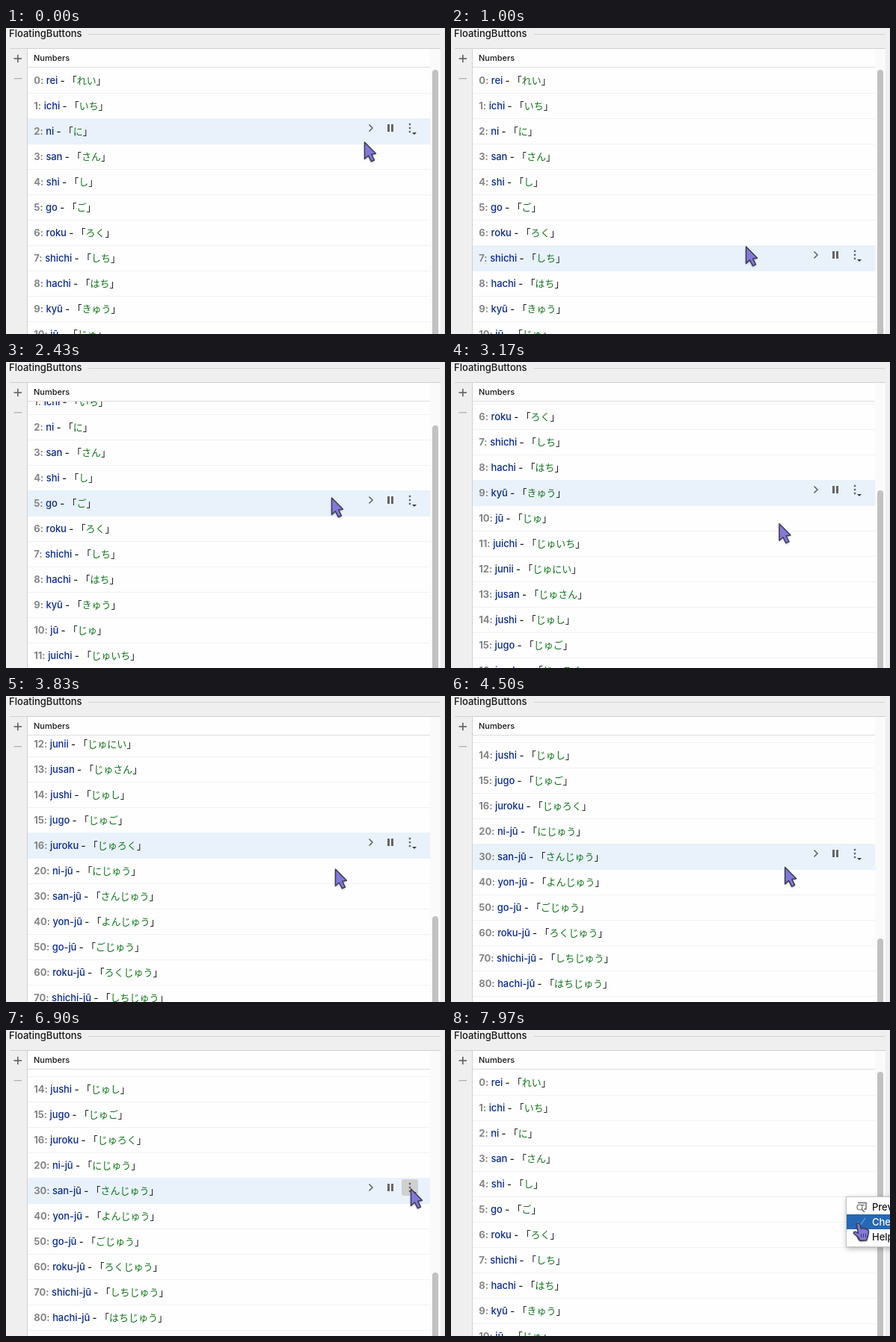
An HTML page with a canvas for the animation above (8000 ms loop, 587x410 px).

```html
<!DOCTYPE html>
<html lang="en">
<head>
<meta charset="utf-8">
<title>Hover list</title>
<style>
html, body { margin: 0; width: 100%; height: 100%; overflow: hidden; background: #efefef; }
canvas { display: block; }
</style>
</head>
<body>
<canvas id="stage" width="587" height="410"></canvas>
<script>
const ctx = document.getElementById('stage').getContext('2d');
const LOOP = 8000, W = 587, H = 410;
const TOP = 53, ROW = 34, LEFT = 29, RIGHT = 567;
const HOVER_LAG = 100, MENU_AT = 7240;
const LATIN = 'Inter, sans-serif';
const KANA = '"Noto Sans CJK JP", "Noto Sans CJK", sans-serif';

const rows = `0 rei れい|1 ichi いち|2 ni に|3 san さん|4 shi し|5 go ご|6 roku ろく
7 shichi しち|8 hachi はち|9 kyū きゅう|10 jū じゅ|11 juichi じゅいち|12 junii じゅにい
13 jusan じゅさん|14 jushi じゅし|15 jugo じゅご|16 juroku じゅろく|20 ni-jū にじゅう
30 san-jū さんじゅう|40 yon-jū よんじゅう|50 go-jū ごじゅう|60 roku-jū ろくじゅう
70 shichi-jū しちじゅう|80 hachi-jū はちじゅう|90 kyū-jū きゅうじゅう|100 hyaku ひゃく`
  .split(/[|\n]/).map(line => line.split(' '));

// time, x, y of the pointer tip
const pointerKeys = [
  [0, 480, 153], [780, 392, 312], [1000, 395, 293], [1700, 415, 225],
  [2300, 436, 183], [2430, 436, 182], [3600, 441, 232], [4350, 441, 232],
  [5000, 486, 213], [5290, 486, 213], [5370, 509, 211], [5500, 514, 213],
  [6050, 514, 213], [6400, 545, 214], [6750, 542, 213], [7300, 542, 213],
  [7750, 542, 258], [7970, 542, 258]
];
const scrollKeys = [
  [2000, 0], [2330, 51], [2460, 51], [3650, 358], [3830, 414], [4100, 460], [4260, 467]
];

// Monotone cubic through the keys, so nothing overshoots
function track(keys, t, col) {
  const last = keys.length - 1;
  if (t <= keys[0][0]) return keys[0][col];
  if (t >= keys[last][0]) return keys[last][col];
  let i = 0;
  while (t > keys[i + 1][0]) i++;
  const slope = k => (keys[k + 1][col] - keys[k][col]) / (keys[k + 1][0] - keys[k][0]);
  const tangent = k => {
    if (k === 0 || k === last) return 0;
    const a = slope(k - 1), b = slope(k);
    return a * b <= 0 ? 0 : 2 * a * b / (a + b);
  };
  const h = keys[i + 1][0] - keys[i][0], u = (t - keys[i][0]) / h, v = 1 - u;
  return keys[i][col] * (1 + 2 * u) * v * v + h * tangent(i) * u * v * v
    + keys[i + 1][col] * u * u * (3 - 2 * u) - h * tangent(i + 1) * u * u * v;
}

const pointerAt = t => ({ x: track(pointerKeys, t, 1), y: track(pointerKeys, t, 2) });
const scrollAt = t => t >= MENU_AT ? 0 : track(scrollKeys, t, 1);

function rect(x, y, w, h, color) {
  ctx.fillStyle = color;
  ctx.fillRect(x, y, w, h);
}

function pill(x, y, w, h, r, color) {
  ctx.fillStyle = color;
  ctx.beginPath();
  ctx.roundRect(x, y, w, h, r);
  ctx.fill();
}

function text(s, x, y, color, font) {
  ctx.font = font;
  ctx.fillStyle = color;
  ctx.fillText(s, x, y);
  return x + ctx.measureText(s).width;
}

function line(points, color, width) {
  ctx.strokeStyle = color;
  ctx.lineWidth = width;
  ctx.beginPath();
  points.forEach(([x, y]) => ctx.lineTo(x, y));
  ctx.stroke();
}

function drawFrame() {
  rect(0, 0, W, H, '#efefef');
  rect(586, 0, 1, H, '#e4e4e4');
  text('FloatingButtons', 4, 12, '#181818', `500 13px ${LATIN}`);
  rect(110, 8, 470, 1, '#d3d3d3');
  rect(5, 27, 576, 1, '#d0d0d0');
  rect(28, 28, 1, H, '#d0d0d0');
  rect(LEFT, 28, RIGHT - LEFT, H, '#fefefe');
  rect(RIGHT, 28, 14, H, '#fafafa');
  rect(10.5, 40.2, 10.5, 1.6, '#606060');
  rect(15, 35.8, 1.6, 10.4, '#606060');
  rect(10.5, 67, 10.5, 1.4, '#b4b4b4');
}

function drawHeader() {
  rect(LEFT, 28, RIGHT - LEFT, 24, '#fefefe');
  rect(LEFT, 52, RIGHT - LEFT, 1, '#dddddd');
  text('Numbers', 37, 44, '#181818', `500 11px ${LATIN}`);
}

function drawRow([num, word, kana], y) {
  const base = y + 22, latin = `500 13px ${LATIN}`, jp = `500 13px ${KANA}`;
  ctx.letterSpacing = '-0.1px';
  let x = text(num + ': ', 37.3, base, '#868686', `700 13px ${LATIN}`);
  x = text(word, x + 0.6, base, '#0b2a94', latin);
  x = text(' - ', x, base, '#181818', latin);
  ctx.letterSpacing = '0px';
  x = text('「', x, base, '#181818', jp);
  x = text(kana, x, base, '#12761c', jp);
  text('」', x, base, '#181818', jp);
}

function drawTools(y, active) {
  const ink = '#666666';
  if (active >= 0) pill(477 + 26 * active, y - 11, 22, 22, 3, '#d0d0d0');
  line([[485.5, y - 4.5], [490, y], [485.5, y + 4.5]], ink, 1.6);
  rect(510, y - 5, 3, 10, ink);
  rect(515, y - 5, 3, 10, ink);
  for (const d of [-5, 0, 5]) rect(538.8, y + d - 1.2, 2.4, 2.4, ink);
  ctx.fillStyle = '#3c3c3c';
  ctx.beginPath();
  ctx.moveTo(543, y + 6);
  ctx.lineTo(549, y + 6);
  ctx.lineTo(546, y + 9);
  ctx.fill();
}

function drawList(t) {
  const scroll = scrollAt(t), past = Math.max(0, t - HOVER_LAG);
  const p = pointerAt(past);
  const hover = t < MENU_AT ? Math.floor((p.y + scrollAt(past) - TOP) / ROW) : -1;
  ctx.save();
  ctx.beginPath();
  ctx.rect(LEFT, TOP, RIGHT - LEFT, H - TOP);
  ctx.clip();
  rows.forEach((row, i) => {
    const y = Math.round(TOP + i * ROW - scroll);
    if (y < TOP - ROW || y > H) return;
    rect(LEFT, y + ROW, RIGHT - LEFT, 1, '#f1f1f1');
    if (i === hover) {
      rect(LEFT, y, RIGHT - LEFT, ROW + 1, '#e9f2fb');
      const mid = y + 13;
      const inside = Math.abs(p.y - mid) < 11;
      drawTools(mid, inside ? [488, 514, 540].findIndex(x => Math.abs(p.x - x) < 11) : -1);
    }
    drawRow(row, y);
  });
  ctx.restore();
  pill(570, Math.round(56 + scroll * 0.577), 8, 500, 4, '#c1c1c1');
}

function drawMenu(p) {
  ctx.save();
  ctx.shadowColor = 'rgba(0,0,0,.28)';
  ctx.shadowBlur = 7;
  ctx.shadowOffsetY = 2;
  rect(529, 223, 90, 68, '#ffffff');
  ctx.restore();
  line([[587, 223.5], [528.5, 223.5], [528.5, 290.5], [587, 290.5]], '#c4c4c4', 1);
  const active = Math.floor((p.y - 227) / 20);
  ['Preview', 'Check', 'Help'].forEach((label, i) => {
    const y = 227 + i * 20;
    if (i === active) rect(529, y, 60, 20, '#2468b6');
    text(label, 563, y + 14.5, i === active ? '#ffffff' : '#181818', `500 13px ${LATIN}`);
  });
  // preview icon: page and lens
  line([[544, 231.5], [555, 231.5], [555, 240], [552, 240]], '#6c6c6c', 1.5);
  line([[549, 234.5], [553, 234.5]], '#6c6c6c', 1.2);
  ctx.beginPath();
  ctx.arc(546.5, 237.5, 3.5, 0, 7);
  ctx.stroke();
  line([[549, 240], [553, 244]], '#6c6c6c', 1.7);
  line([[544, 257], [547.5, 261], [554, 252]], '#4f9fd8', 1.6);
  ctx.strokeStyle = '#6c6c6c';
  ctx.beginPath();
  ctx.arc(549, 277, 5.5, 0, 7);
  ctx.stroke();
  text('?', 546.4, 280.5, '#6c6c6c', `600 9px ${LATIN}`);
}

const ARROW = new Path2D('M0 0L0 22.5L5 18L9 25.8L13 24L9.2 16.2L15 15.3Z');
const HAND = new Path2D('M1 2.5Q2.5-.5 5 2L7 8.5Q9 6.5 11 8.5Q13 7 14.5 9.5Q17 9 17 12L16 18L14 24H5' +
  'L3.5 20L-3 14.5Q-3.5 11.5 0 12.5L3 14.5Z');

function drawPointer({ x, y }, hand) {
  const shape = hand ? HAND : ARROW;
  ctx.save();
  ctx.translate(x - 0.5, y);
  ctx.lineJoin = 'round';
  ctx.save();
  ctx.shadowColor = 'rgba(0,0,0,.35)';
  ctx.shadowBlur = 3;
  ctx.shadowOffsetY = 1.5;
  ctx.fillStyle = '#8179d8';
  ctx.fill(shape);
  ctx.restore();
  ctx.strokeStyle = '#3d3b55';
  ctx.lineWidth = 1.5;
  ctx.stroke(shape);
  if (hand) for (const fx of [7, 10, 13]) line([[fx, 15], [fx, 20]], '#3d3b55', 1);
  ctx.restore();
}

function render(t) {
  const p = pointerAt(t), open = t >= MENU_AT;
  drawFrame();
  drawList(t);
  drawHeader();
  if (open) drawMenu(p);
  drawPointer(p, open && p.y > 227);
}

function tick() {
  render(performance.now() % LOOP);
  requestAnimationFrame(tick);
}
tick();
</script>
</body>
</html>
```
